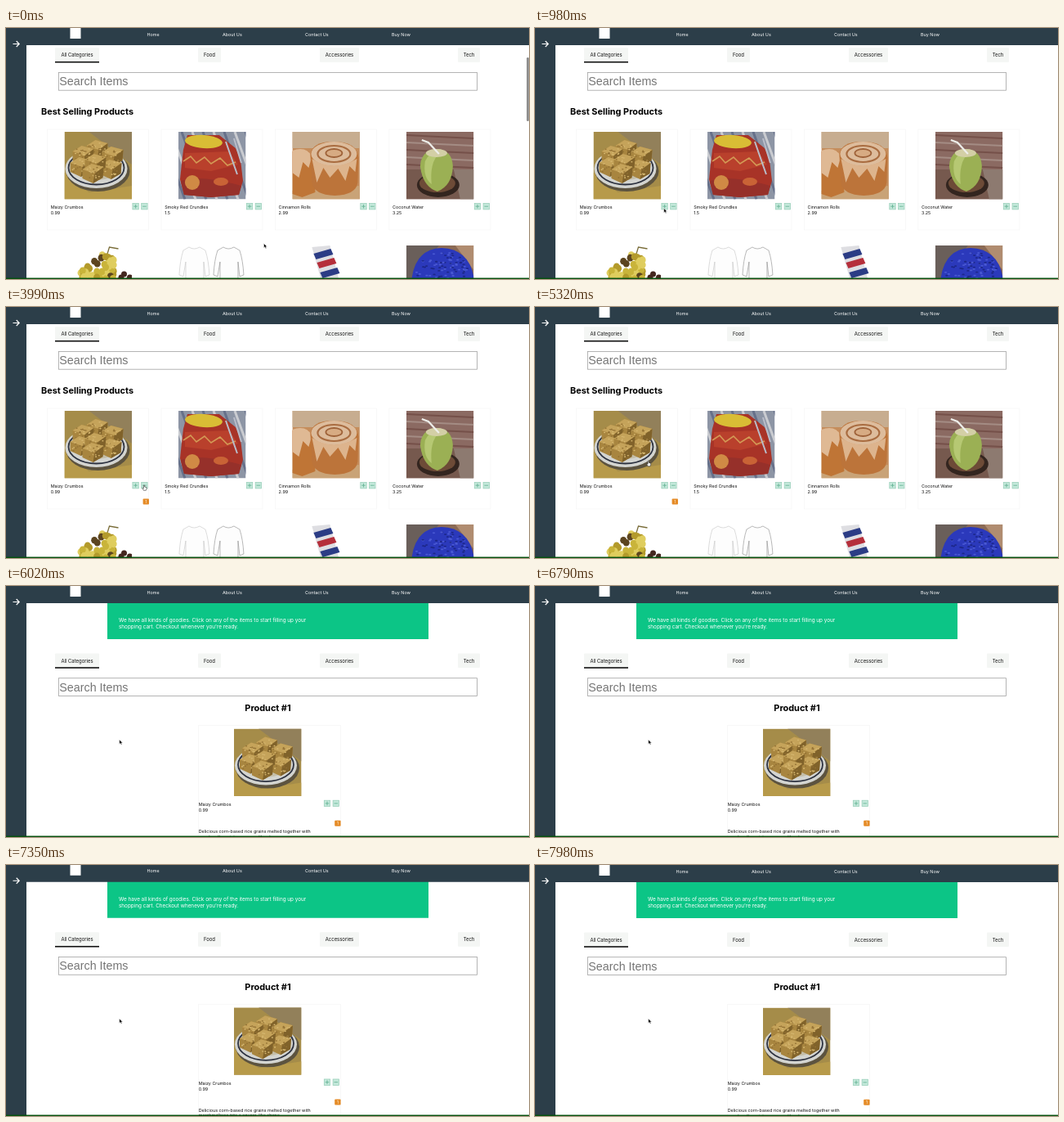
Animation, 640 px wide and 307 px high, one loop 8000 ms. Source, as an HTML page:

```html
<!DOCTYPE html>
<html lang="en">
<head>
<meta charset="utf-8">
<title>Store</title>
<style>
html, body { margin: 0; width: 100%; height: 100%; overflow: hidden; background: #fff; }
svg { display: block; width: 100vw; height: 100vh; }
text { font-family: Inter, "Open Sans", sans-serif; font-size: 5.4px; fill: #111; }
.nav { font-size: 5.45px; fill: #fff; }
.tab { font-size: 5.95px; text-anchor: middle; }
.search { font: 14.3px "Liberation Sans", Arial, sans-serif; fill: #757575; }
.head { font-size: 10.9px; font-weight: 700; fill: #000; }
.banner { font-size: 6.37px; fill: #fff; }
.count { fill: #fff0d8; text-anchor: middle; }
</style>
</head>
<body>
<svg id="stage" viewBox="0 0 640 307" preserveAspectRatio="none"></svg>
<script>
const rect = (x, y, w, h, fill, more = '') =>
  `<rect x="${x}" y="${y}" width="${w}" height="${h}" fill="${fill}" ${more}/>`;
const oval = (x, y, rx, ry, fill, more = '') =>
  `<ellipse cx="${x}" cy="${y}" rx="${rx}" ry="${ry}" fill="${fill}" ${more}/>`;
const path = (d, fill, more = '') => `<path d="${d}" fill="${fill}" ${more}/>`;
const line = (d, stroke, width) => path(d, 'none', `stroke="${stroke}" stroke-width="${width}"`);
const text = (x, y, s, cls = '', more = '') => `<text x="${x}" y="${y}" class="${cls}" ${more}>${s}</text>`;
const group = (s, more = '') => `<g ${more}>${s}</g>`;
const at = (x, y, s) => group(s, `transform="translate(${x} ${y})"`);
const repeat = (n, f) => Array.from({ length: n }, (_, i) => f(i)).join('');

let seed = 7;
const rand = () => (seed = seed * 16807 % 2147483647) / 2147483647;
const specks = (n, x, y, w, h, colours) => repeat(n, i =>
  oval(x + rand() * w, y + rand() * h, 1.1, .8, colours[i % colours.length]));

// Product pictures, each 82.5 units square
const bar = (x, y) =>
  path(`M${x} ${y}l11 -7l15 4l-1 13l-12 7l-13 -6z`, '#a8853f') +
  path(`M${x} ${y}l11 -7l15 4l-11 8z`, '#c5a35a') +
  path(`M${x + 15} ${y + 5}l11 -8l-1 13l-12 7z`, '#80622a') +
  specks(22, x + 2, y - 4, 20, 16, ['#d6b770', '#927033']);

const squares = rect(0, 0, 82.5, 82.5, '#a58c49') +
  path('M30 0H82.5V40z', '#92805a') + path('M0 50L30 74L82.5 66V82.5H0z', '#b79a4a') +
  oval(41, 48, 39, 25, '#5c533f') + oval(39, 45, 38, 24, '#d3d4d0') +
  oval(39, 44, 34, 20.5, 'none', 'stroke="#2d3240" stroke-width="1.8"') +
  oval(39, 43, 29, 16, '#c4bea9') +
  [[27, 17], [10, 24], [46, 25], [7, 38], [44, 41], [25, 34], [22, 46]].map(p => bar(...p)).join('');

const snackBag = rect(0, 0, 82.5, 82.5, '#8d95a5') +
  repeat(9, i => line(`M${i * 13 - 22} 0l30 82.5`, i % 2 ? '#c9cbd0' : '#66708a', 3)) +
  path('M6 22L11 4L50 4L70 20L76 34L79 60L74 77L40 80L7 77L2 58z', '#a83327') +
  path('M8 26L62 24L73 40L40 48L8 44z', '#b9402c') +
  path('M3 60Q30 52 77 66L74 77L40 80L7 77z', '#96302a') +
  line('M6 36l9 -6l7 8l10 -7l8 8l11 -7l9 9l10 -4', '#d39a55', 1.6) +
  line('M58 12l14 40M68 8l9 30', '#b9bcc8', 2) +
  oval(31, 12, 23, 8, '#d9bd35', 'transform="rotate(4 31 12)"') +
  oval(17, 62, 9, 9, '#d08a45') + oval(52, 61, 9, 5, '#c96336');

const rolls = rect(0, 0, 82.5, 82.5, '#c58d5c') + rect(0, 0, 82.5, 20, '#c7ad90') +
  path('M0 72L82.5 66V82.5H0z', '#c9a377') +
  path('M0 24Q18 17 26 32L28 74L12 80L0 76z', '#bf7536') +
  path('M0 23Q17 17 24 30L20 44L13 37L8 56L0 50z', '#dfb994') +
  path('M22 28Q24 12 50 12Q80 12 81 32L80 62Q78 77 52 78Q26 77 24 62z', '#bc743a') +
  oval(51, 27, 28, 15, '#ddbc9c') +
  oval(51, 27, 20, 10, 'none', 'stroke="#a96c40" stroke-width="2.2"') +
  oval(51, 26, 10, 5, '#d7ab83', 'stroke="#9f633a" stroke-width="1.8"') +
  path('M24 33Q50 50 79 33L77 49L70 42L65 60L56 45L46 56L38 44L30 62z', '#ddb48d');

const coconut = rect(0, 0, 82.5, 82.5, '#8b6a62') +
  repeat(5, i => line(`M0 ${4 + i * 9}L82.5 ${8 + i * 9}`, i % 2 ? '#a48c84' : '#755049', 2)) +
  path('M0 46H82.5V82.5H0z', '#76594e') + path('M58 46H82.5V82.5H66z', '#8d7a70') +
  oval(39, 65, 26, 15, '#33251f') + oval(38, 63, 22, 11, '#6d4b37') +
  path('M17 42Q18 23 37 21Q56 22 57 42Q56 66 38 73Q20 67 17 42z', '#9bb054') +
  path('M23 36Q28 24 41 25Q28 38 31 64Q20 56 23 36z', '#b6c873') +
  oval(37, 26, 13, 5, '#d3cfa6') +
  line('M40 27L27 13L19 10', '#eeeeea', 2.2);

const grapes = line('M52 12L55 2L66 4', '#796d39', 1.3) +
  repeat(46, i => {
    const x = 20 + rand() * 42, peak = 8 + Math.abs(x - 50) * .8;
    return oval(x, peak + rand() * (44 - peak), 4, 4.3, i % 12 === 5 ? '#5c4520' : ['#c9b43a', '#dfcd5e', '#b39a2b'][i % 3]);
  }) +
  repeat(5, i => oval(66 + i * 3.5, 43 - i % 3 * 4, 3.5, 3.6, '#45271f'));

const shirt = (x, tone) => at(x, 0, path(
  'M12 2Q18 6 25 2L32 6Q36 18 37 36L32 38L30 20V45H8V20L5 38L0 36Q1 18 5 6z', '#fdfdfd',
  `stroke="${tone}" stroke-width=".6"`));
const shirts = shirt(1, '#c4c4c4') + shirt(43, '#8a8a8a');

const stripe = (x, y, colour) => path(`M${x} ${y + 6}l21 -6l3 7l-21 6z`, colour);
const sock = path('M24 2L46 0L58 45H36z', '#dedee2') +
  stripe(26, 4, '#2b3c85') + stripe(30, 15, '#b52f3b') + stripe(34, 27, '#2b3c85');

const beanie = rect(0, 0, 82.5, 45, '#8b6a55') + path('M0 0H40L6 45H0z', '#6a5f5a') +
  path('M60 0H82.5V30z', '#b08c70') +
  path('M6 45Q10 4 43 3Q76 4 82.5 38V45z', '#2b39bb') +
  repeat(90, i => {
    const a = Math.PI * (1 + rand()), r = 36 * Math.sqrt(rand());
    return oval(44 + r * Math.cos(a), 43 + r * Math.sin(a), 1.7, .9, i % 2 ? '#1c2788' : '#4a5ad4');
  });

// Page parts
const button = (x, y, glyph) => rect(x, y, 7.4, 7.4, '#c3e8da', 'stroke="#93ccb5" stroke-width=".7"') +
  line(`M${x + 1.4} ${y + 3.7}h4.6${glyph === '+' ? `M${x + 3.7} ${y + 1.4}v4.6` : ''}`, '#5fae90', .8);
const buttons = (x, y) => button(x, y, '+') + button(x + 10.8, y, '-');
const badge = (x, y) => group(rect(x, y, 7.4, 7, '#e58b27', 'rx="1"') +
  text(x + 3.7, y + 5.5, '', 'count'), 'class="badge"');
const box = (x, y, w, h) => rect(x, y, w, h, 'none', 'stroke="#f6f6f6" stroke-width=".7"');

const tabs = [['All Categories', 60, 54], ['Food', 235, 28], ['Accessories', 384, 48], ['Tech', 553, 27]];
const filters = y => tabs.map(([s, x, w]) =>
  rect(x, y, w, 17.5, '#f4f6f4', 'rx="1"') + text(x + w / 2, y + 11, s, 'tab')).join('') +
  rect(60, y + 16.7, 54, 1.6, '#111') +
  rect(64.5, y + 30.2, 512, 21.8, '#fff', 'stroke="#a2a2a2" stroke-width=".8"') +
  text(65.3, y + 46, 'Search Items', 'search');

const goods = [
  ['Maizy Crumbos', '0.99', squares, grapes], ['Smoky Red Crundles', '1.5', snackBag, shirts],
  ['Cinnamon Rolls', '2.99', rolls, sock], ['Coconut Water', '3.25', coconut, beanie]];

const framed = s => `<svg width="82.5" height="82.5" overflow="hidden">${s}</svg>`;
const shelf = goods.map(([name, price, top, low], i) => at(i * 139.45, 0,
  box(50.5, 124, 124, 123) + at(71.5, 127, framed(top)) + at(71.5, 266, framed(low)) +
  text(54.7, 221, name) + text(54.7, 228, price) + buttons(154.9, 214.5))).join('');

const home = filters(24.2) + text(43, 106.2, 'Best Selling Products', 'head') + shelf + badge(167.6, 234.6);

const detail = rect(124, 20, 393, 45, '#0cc586') +
  text(138, 44, "We have all kinds of goodies. Click on any of the items to start filling up your", 'banner') +
  text(138, 52, "shopping cart. Checkout whenever you're ready.", 'banner') +
  filters(82.5) + text(320.5, 153.3, 'Product #1', 'head', 'text-anchor="middle"') +
  box(235.5, 170.5, 174, 180) + at(279, 174.6, framed(squares)) +
  text(235.7, 269, goods[0][0]) + text(235.7, 276, '0.99') + buttons(389.3, 262.2) + badge(402.2, 286.8) +
  text(235.7, 302, 'Delicious corn-based rice grains melted together with') +
  text(235.7, 308.6, 'marshmallows into a square-like shape.');

const frame = rect(0, -10, 640, 31, '#2c3e49') + rect(0, 0, 25, 330, '#2c3e49') +
  rect(78.5, 0, 13, 13, '#fff') +
  [['Home', 172.5], ['About Us', 265], ['Contact Us', 366], ['Buy Now', 472]]
    .map(([s, x]) => text(x, 9.6, s, 'nav')).join('') +
  line('M8.5 19.5H16M12.7 16L16.2 19.5L12.7 23', '#fff', 1.2);

const arrow = path('M0 0V5.4L1.3 4.3L2.2 6.3L3.2 5.8L2.3 3.9H4z', '#000', 'stroke="#fff" stroke-width=".5"');
const hand = path('M-.6 .5Q0 -.5 .6 .5V2.4L3 3.2V5L2.3 6.8H-.6L-2 4.2L-1.5 3.6L-.6 4.4z',
  '#fff', 'stroke="#111" stroke-width=".5"');

const stage = document.getElementById('stage');
stage.innerHTML = group(group(home, 'id="home"') + group(detail, 'id="detail"') + frame, 'id="page"') +
  rect(637.2, 36, 2.6, 78, '#858585', 'rx="1.3" id="scroll"') +
  rect(0, 305.6, 640, 1.4, '#04500c') +
  group(group(arrow, 'id="arrow"') + group(hand, 'id="hand"'), 'id="cursor"');

const $ = id => document.getElementById(id);
const show = (el, on) => el.setAttribute('visibility', on ? 'visible' : 'hidden');
const badges = [...document.querySelectorAll('.badge')];

// Eased value along rows of [time, ...values]
function follow(keys, t) {
  const next = keys.findIndex(k => k[0] > t);
  if (next < 0) return keys[keys.length - 1].slice(1);
  if (!next) return keys[0].slice(1);
  const a = keys[next - 1], b = keys[next], u = (t - a[0]) / (b[0] - a[0]), e = u * u * (3 - 2 * u);
  return a.slice(1).map((v, i) => v + (b[i + 1] - v) * e);
}

const trail = [[70, 315.5, 263.5], [910, 157.7, 220.5], [1050, 157.7, 220.5], [1260, 158.3, 217.2],
  [3010, 158.3, 217.2], [3430, 169, 217.5], [4270, 169, 217.5], [4970, 138.7, 188]];
const bounce = [[6860, 0], [7070, -2.4], [7420, 0]];
const fade = [[280, 1], [560, 0]];
const counts = [[1470, 1], [2030, 2], [3850, 1]];
const openTime = 5600;

function draw(now) {
  const t = Math.floor(now % 8000 / 70) * 70;
  const onDetail = t >= openTime, onLink = t >= 1190 && !onDetail;
  const count = counts.reduce((n, [from, v]) => t >= from ? v : n, 0);
  const [x, y] = follow(trail, t);
  show($('home'), !onDetail);
  show($('detail'), onDetail);
  badges.forEach((b, i) => {
    show(b, count > 0 && onDetail === (i === 1));
    b.lastChild.textContent = count;
  });
  $('page').setAttribute('transform', `translate(0 ${follow(bounce, t)[0]})`);
  $('scroll').setAttribute('opacity', follow(fade, t)[0]);
  $('cursor').setAttribute('transform', `translate(${x} ${y})`);
  show($('arrow'), !onLink);
  show($('hand'), onLink);
  requestAnimationFrame(() => draw(performance.now()));
}
draw(performance.now());
</script>
</body>
</html>
```
